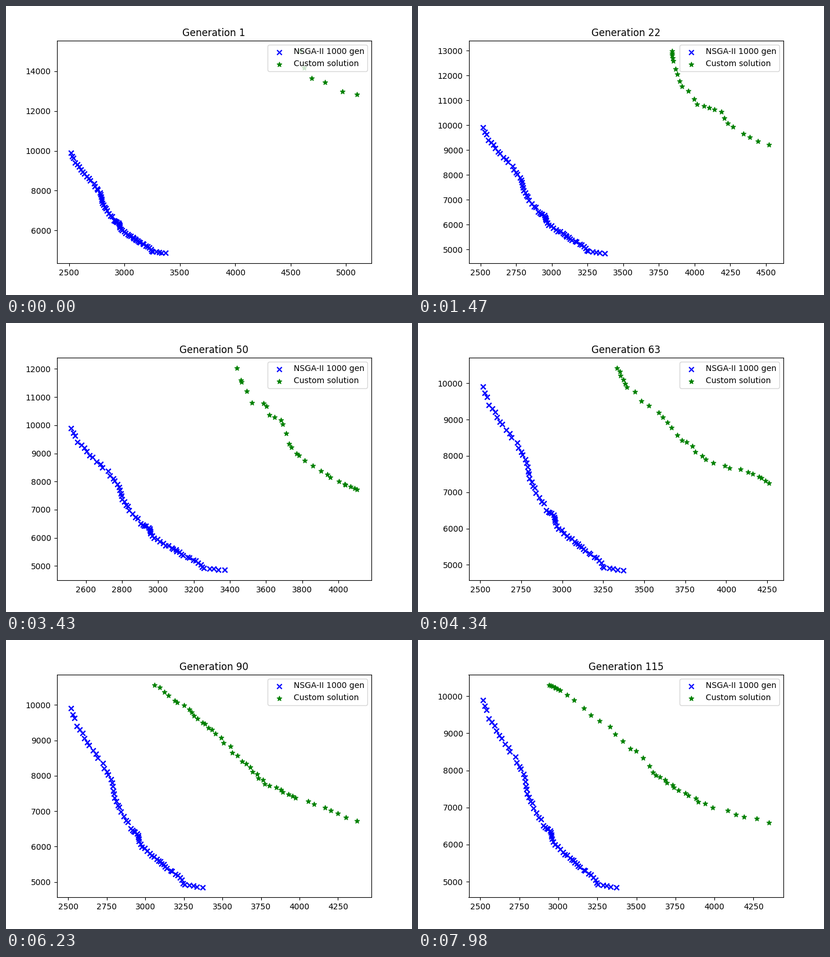
A matplotlib script for the animation above (8000 ms loop, 700x500 px).

```python
import numpy as np
import matplotlib.pyplot as plt
from matplotlib.animation import FuncAnimation

LOOP, TICK, HOLD = 8000, 40, 70  # ms


def scattered(count, bends, seed):
    """Spread points along a bent line, uneven between the bends."""
    xs, ys = np.array(bends, float).T
    last = len(bends) - 1
    rng = np.random.default_rng(seed)
    loose = 0.45 * (1 - len(bends) / count)

    def places():
        shift = rng.uniform(-loose, loose, count)
        shift[[0, -1]] = 0
        return (np.arange(count) + shift) * last / (count - 1)

    knots = np.arange(last + 1)
    return np.column_stack([np.interp(places(), knots, xs),
                            np.interp(places(), knots, ys)])


reference = scattered(64, [
    (2518, 9900), (2574, 9260), (2641, 8820), (2732, 8300), (2783, 7825),
    (2802, 7388), (2842, 6980), (2908, 6490), (2953, 6360), (2960, 6100),
    (3028, 5800), (3090, 5595), (3130, 5420), (3208, 5200), (3255, 4935),
    (3371, 4855)], seed=0)

# generation: number of points and the bends of the front
shapes = {
    1: (6, [(4588, 15032), (4621, 14174), (4689, 13650), (4810, 13440),
            (4967, 12980), (5099, 12830)]),
    22: (23, [(3842, 12990), (3846, 12665), (3895, 11700), (4029, 10850),
              (4171, 10570), (4281, 9815), (4522, 9222)]),
    38: (18, [(3535, 13525), (3627, 11690), (3737, 11120), (3752, 9708),
              (3889, 8952), (3904, 8270), (3982, 8097)]),
    63: (30, [(3333, 10425), (3396, 9919), (3602, 9106), (3748, 8405),
              (3888, 7831), (4149, 7543), (4261, 7257)]),
    77: (34, [(3209, 10905), (3293, 9850), (3423, 9307), (3625, 8621),
              (3717, 8172), (3851, 7653), (4306, 6788)]),
    90: (43, [(3059, 10568), (3279, 9850), (3429, 9296), (3631, 8400),
              (3783, 7776), (3985, 7383), (4374, 6730)]),
    115: (38, [(2940, 10305), (3013, 10160), (3349, 9138), (3592, 8015),
               (3741, 7548), (3927, 7111), (4350, 6589)]),
}
fronts = {gen: scattered(*shape, seed=gen) for gen, shape in shapes.items()}
stops = sorted(fronts)


def non_dominated(pts):
    kept, lowest = [], np.inf
    for x, y in sorted(map(tuple, pts)):
        if y < lowest:
            kept.append((x, y))
            lowest = y
    return np.array(kept)


def front_at(gen):
    if gen in fronts:
        return fronts[gen]
    i = np.searchsorted(stops, gen)
    a, b = stops[i - 1], stops[i]
    old, new = fronts[a], fronts[b]
    n = len(new)
    pair = old[np.rint(np.linspace(0, len(old) - 1, n)).astype(int)]
    # each point rests for a few generations, then jumps ahead
    rng = np.random.default_rng(b)
    rest = rng.integers(1, 5, n)
    wait = (gen + rng.integers(0, 4, n)) % rest
    part = np.clip((gen - wait - a) / (b - a), 0, 1)[:, None]
    return non_dominated(pair + (new - pair) * part)


def padded(values):
    lo, hi = values.min(), values.max()
    pad = 0.05 * (hi - lo)
    return lo - pad, hi + pad


fig, ax = plt.subplots(figsize=(7, 5), dpi=100)
# every reference solution occurs twice, which gives bolder crosses
ax.scatter(*np.repeat(reference, 2, axis=0).T, c="blue", marker="x",
           label="NSGA-II 1000 gen")
stars = ax.scatter(*fronts[1].T, c="green", marker="*",
                   label="Custom solution")
ax.legend(loc="upper right")
title = ax.set_title("Generation 1")


def draw(k):
    gen = (k * TICK + TICK - 10) // HOLD + 1
    front = front_at(gen)
    stars.set_offsets(front)
    both = np.vstack([reference, front])
    ax.set_xlim(*padded(both[:, 0]))
    ax.set_ylim(*padded(both[:, 1]))
    title.set_text(f"Generation {gen}")
    return stars, title


anim = FuncAnimation(fig, draw, frames=LOOP // TICK, interval=TICK,
                     repeat=True, repeat_delay=0, blit=False)
plt.show()
```
